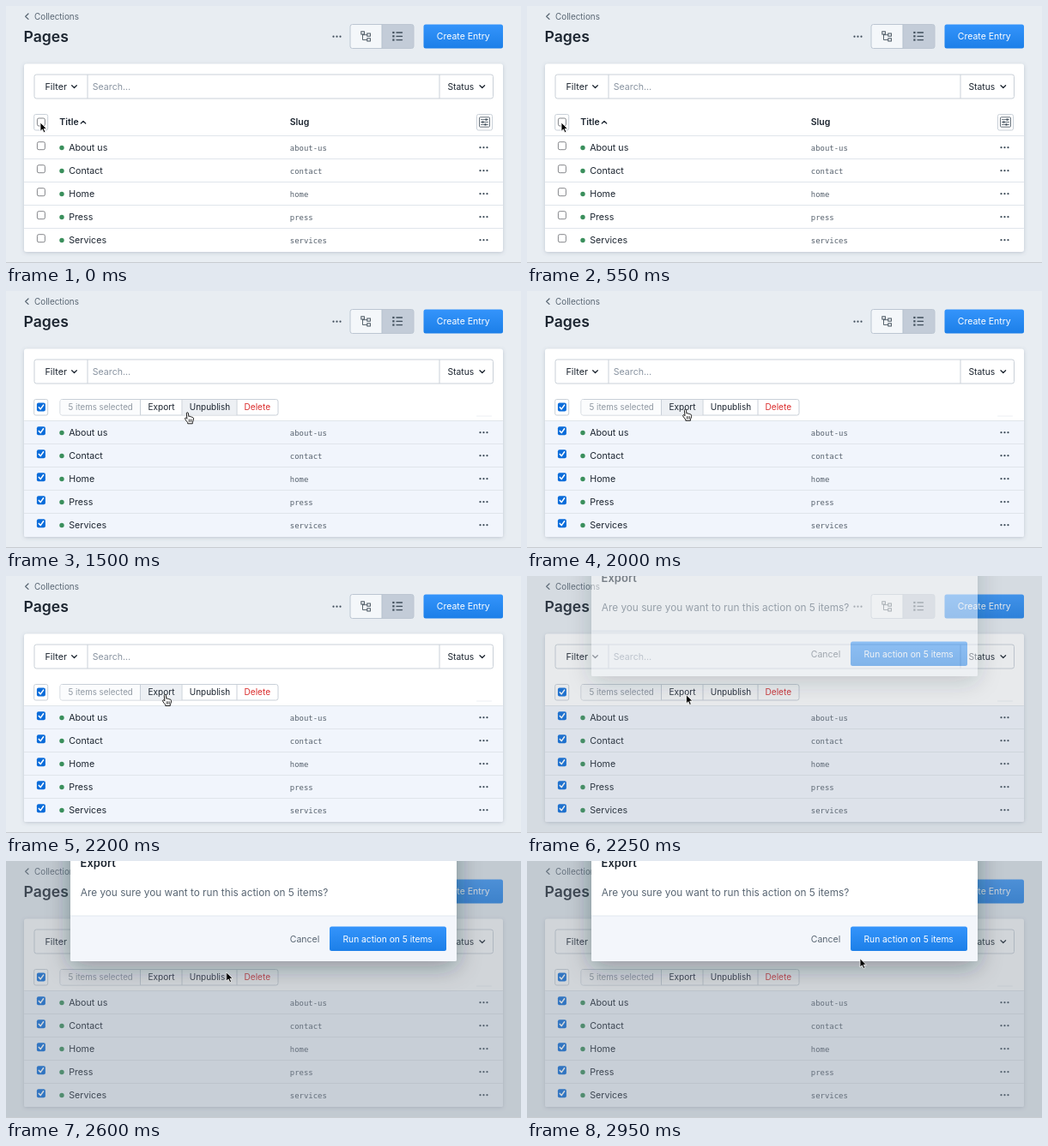
An HTML page that plays this animation: 600x300 px, repeating every 3000 ms.

```html
<!DOCTYPE html>
<html lang="en">
<head>
<meta charset="utf-8">
<title>Pages</title>
<style>
  html, body { margin: 0; width: 100%; height: 100%; overflow: hidden; background: #e8edf2; }
  svg { display: block; width: 600px; height: 300px; font-family: Inter, "Liberation Sans", sans-serif; }
  text { white-space: pre; }
  .mono { font-family: "DejaVu Sans Mono", monospace; }
</style>
</head>
<body>
<svg id="stage" viewBox="0 0 600 300" xmlns="http://www.w3.org/2000/svg"></svg>
<script>
const LOOP = 3000, STEP = 50;
const CHECK_AT = 700, MODAL_AT = 2250;
const INK = '#1c2530', GREY = '#596673', EDGE = '#c9d0d8', BLUE = '#0b6cda';

const rows = ['About us', 'Contact', 'Home', 'Press', 'Services'];
const rowY = i => 151.5 + 27 * i;

const text = (x, y, label, size = 10.6, fill = INK, extra = '') =>
  `<text x="${x}" y="${y}" font-size="${size}" fill="${fill}" ${extra}>${label}</text>`;
const rect = (x, y, w, h, fill, stroke = 'none', r = 0, extra = '') =>
  `<rect x="${x}" y="${y}" width="${w}" height="${h}" rx="${r}" fill="${fill}" stroke="${stroke}" ${extra}/>`;
const line = (d, stroke = EDGE, width = 1) =>
  `<path d="${d}" fill="none" stroke="${stroke}" stroke-width="${width}" stroke-linecap="round" stroke-linejoin="round"/>`;
const dots = (x, y) => [-4, 0, 4].map(d =>
  `<circle cx="${x + d}" cy="${y}" r="1.1" fill="#3f4d5a"/>`).join('');
const emptyBox = (x, y) => rect(x - 4.5, y - 4.5, 9, 9, '#fff', '#76797d', 1.8, 'stroke-width=".9"');
const tickedBox = (x, y) => rect(x - 5, y - 5, 10, 10, BLUE, 'none', 2) +
  line(`M${x - 2.6} ${y + .2}l1.9 2.2 3.4-4.8`, '#fff', 1.5);
const blueButton = (x, y, w, h) => rect(x, y, w, h, 'url(#blue)', 'none', 2.5);

function header() {
  return line('M26 9l-3.3 3.2 3.3 3.2', GREY, 1.3) +
    text(33, 16, 'Collections', 9.9, GREY) +
    text(20.5, 42, 'Pages', 17.6, INK, 'font-weight="600"') +
    dots(385.5, 35.7) +
    rect(401, 21.5, 74, 28, '#f4f7fa', 'none', 2.5) +
    '<path d="M438 21.5h34.5a2.5 2.5 0 0 1 2.5 2.5v23a2.5 2.5 0 0 1-2.5 2.5h-34.5z" fill="#c3ccd8"/>' +
    rect(401, 21.5, 74, 28, 'none', '#bcc6d2', 2.5) + line('M438 22v27', '#b5c0cd') +
    rect(413.8, 29.8, 3.6, 3.2, 'none', '#47545f') +
    rect(420.8, 32, 3.6, 3.2, 'none', '#47545f') +
    rect(420.8, 37.8, 3.6, 3.2, 'none', '#47545f') +
    line('M415.5 33.5v6h5M415.5 33.7h5', '#47545f', .9) +
    [31, 35.3, 39.6].map(y => rect(450.3, y - 1.1, 2.2, 2.2, '#3f4d5a') +
      line(`M455 ${y}h6.5`, '#3f4d5a', 1.3)).join('') +
    blueButton(486.5, 21.5, 92.5, 28) +
    text(501.8, 39, 'Create Entry', 10.5, '#fff');
}

function card() {
  return rect(21, 67.5, 558, 219.5, '#fff', 'none', 3, 'filter="url(#cardShadow)"') +
    rect(33, 80, 534.5, 28, '#fff', EDGE, 2.5) +
    line('M95 80.5v27M505 80.5v27') +
    text(45.5, 97.5, 'Filter', 10.8) + line('M76.7 92.8l2.8 2.7 2.8-2.7', INK, 1.3) +
    text(100.8, 97.5, 'Search…', 10.6, '#8893a0') +
    text(514.5, 97.5, 'Status', 10.3) + line('M552 92.8l2.8 2.7 2.8-2.7', INK, 1.3);
}

function plainHead() {
  return text(62.3, 139, 'Title', 10.5, INK, 'font-weight="600"') +
    line('M87.3 137l2.7-2.6 2.7 2.6', INK, 1.3) +
    text(330.7, 139, 'Slug', 10.5, INK, 'font-weight="600"') +
    rect(548.5, 126.5, 18, 18.5, '#fff', EDGE, 2) +
    rect(551.5, 129.8, 12, 11.4, 'none', '#56626e', 1, 'stroke-width=".9"') +
    [132.6, 135.5, 138.4].map((y, i) => line(`M553.5 ${y}h8`, '#56626e', .9) +
      rect([558.5, 554.5, 557.5][i], y - 1.1, 2, 2.2, '#3f4d5a')).join('') +
    emptyBox(40.9, 135.5) + rows.map((_, i) => emptyBox(40.9, rowY(i) + 11.7)).join('');
}

function bulkHead() {
  return line('M548.5 146h17', '#eceff3') +
    rect(63, 126.5, 254, 18.5, '#fff', EDGE, 2.5) +
    rect(63.5, 127, 93, 17.5, '#fbfcfd') +
    '<rect id="hover" y="127" height="17.5" fill="#edf0f4"/>' +
    line('M156.5 127v17.5M205 127v17.5M269 127v17.5') +
    text(72.5, 139.4, '5 items selected', 9.75, '#8f98a2') +
    text(165.5, 139.4, 'Export', 10.1) +
    text(213.7, 139.4, 'Unpublish', 10) +
    text(277.5, 139.4, 'Delete', 10.1, '#da2c2c') +
    tickedBox(40.9, 135.5) + rows.map((_, i) => tickedBox(40.9, rowY(i) + 11.7)).join('');
}

function tableRows() {
  return rows.map((name, i) => {
    const y = rowY(i);
    return line(`M21.5 ${y}h557`, '#e0e5eb') +
      `<circle cx="65" cy="${y + 14}" r="2.7" fill="#3a8f5c"/>` +
      text(73.2, y + 17.4, name, 10.7) +
      text(330.8, y + 17.4, name.toLowerCase().replace(' ', '-'), 8.95, '#56616d', 'class="mono"') +
      dots(556.5, y + 13.7);
  }).join('');
}

function modal() {
  return rect(75, -40, 450, 157, '#fff', 'none', 3, 'filter="url(#modalShadow)"') +
    rect(75, 64, 450, 53, '#f3f6fb', 'none', 2) + line('M75.5 64h449', '#e2e8ef') +
    text(86.6, 7, 'Export', 13, INK, 'font-weight="600"') +
    text(86.8, 41.2, 'Are you sure you want to run this action on 5 items?', 11.8, GREY) +
    text(330.8, 94.5, 'Cancel', 10.5, GREY) +
    blueButton(377, 76.5, 136, 28.5) +
    text(392.5, 94.5, 'Run action on 5 items', 10.25, '#fff');
}

const arrowPath = 'M0 0V10.2L2.4 8 4 11.7 5.8 10.9 4.2 7.3H7.4Z';
const handPath = 'M-1.2 .8C-1.2-.6 .8-.6 .9 .8L1.4 4.6C2 3.9 3.2 4.1 3.4 5 4.2 4.4 5.2 4.8 5.3 5.6 6.2 5.2 7 5.8 7 6.8 7 9 6.4 10.4 5.8 11.2V12.8H.2V11.6C-.8 10.4-2 9-2.9 7.4-3.4 6.3-2.2 5.6-1.2 6.6L-.6 7.2Z';

const stage = document.getElementById('stage');
stage.innerHTML = `<defs>
  <linearGradient id="blue" x2="0" y2="1"><stop stop-color="#3494fb"/><stop offset="1" stop-color="#1c7fe8"/></linearGradient>
  <filter id="cardShadow" x="-5%" y="-10%" width="110%" height="120%">
    <feDropShadow dx="0" dy="1" stdDeviation="2" flood-color="#5a6b80" flood-opacity=".3"/></filter>
  <filter id="modalShadow" x="-20%" y="-40%" width="140%" height="200%">
    <feDropShadow dx="0" dy="6" stdDeviation="14" flood-color="#1f2933" flood-opacity=".38"/></filter>
</defs>
${rect(0, 0, 600, 300, '#e8edf2')}${header()}${card()}
<g id="tint">${rect(21, 151.5, 558, 135.5, '#f1f5fc', 'none', 2)}</g>
${tableRows()}
${rect(32.7, 126.5, 16, 18.5, '#fff', EDGE, 2)}
<g id="plain">${plainHead()}</g><g id="bulk">${bulkHead()}</g>
<rect id="shade" width="600" height="300" fill="#7b8793"/>
<g id="modal">${modal()}</g>
${rect(0, 299, 600, 1, '#c8ccd1')}
<g id="cursor" stroke-linejoin="round">
  <path id="arrow" d="${arrowPath}" fill="#000" stroke="#fff" stroke-width=".8"/>
  <g id="hand"><path d="${handPath}" fill="#fff" stroke="#111" stroke-width=".95"/>
  ${line('M1.6 8v2.6M3.2 8v2.6M4.8 8v2.6', '#111', .7)}</g>
</g>`;

const part = Object.fromEntries([...stage.querySelectorAll('g[id], path[id], rect[id]')].map(el => [el.id, el]));
const show = (el, on) => el.setAttribute('visibility', on ? 'visible' : 'hidden');
const smooth = p => p * p * (3 - 2 * p);

// Each key is [time, ...values].
function track(keys, t, ease = p => p) {
  const next = keys.findIndex(k => k[0] > t);
  if (next < 0) return keys[keys.length - 1].slice(1);
  const a = keys[next - 1], b = keys[next];
  const p = ease((t - a[0]) / (b[0] - a[0]));
  return a.slice(1).map((v, i) => v + (b[i + 1] - v) * p);
}

const cursorKeys = [
  [0, 40, 136], [550, 40, 136], [900, 38.6, 135.3], [1100, 38.6, 135.3],
  [1500, 211.5, 142], [1650, 211.5, 142], [1950, 184.5, 138.5],
  [2200, 185.5, 138.7], [2400, 185.5, 138.7], [2900, 388, 113.8], [LOOP, 388, 113.8]
];
const fadeKeys = [[0, 0], [2200, 0], [2250, .5], [2300, .86], [2350, 1]];

function render(t) {
  const selected = t >= CHECK_AT;
  show(part.plain, !selected);
  show(part.bulk, selected);
  show(part.tint, selected);

  const [x, y] = track(cursorKeys, t, smooth);
  const onButton = selected && t < MODAL_AT && x > 157 && x < 317 && y > 126 && y < 145;
  part.cursor.setAttribute('transform', `translate(${x.toFixed(2)} ${y.toFixed(2)})`);
  show(part.arrow, !onButton);
  show(part.hand, onButton);

  const [left, right] = x < 205 ? [157, 204.5] : [205.5, 268.5];
  part.hover.setAttribute('x', left);
  part.hover.setAttribute('width', right - left);
  show(part.hover, onButton);

  const [fade] = track(fadeKeys, t);
  part.shade.setAttribute('opacity', .35 * fade);
  part.modal.setAttribute('opacity', fade);
}

let start;
function tick(now) {
  start ??= now;
  render(Math.floor((now - start) % LOOP / STEP) * STEP);
  requestAnimationFrame(tick);
}
render(0);
requestAnimationFrame(tick);
</script>
</body>
</html>
```
